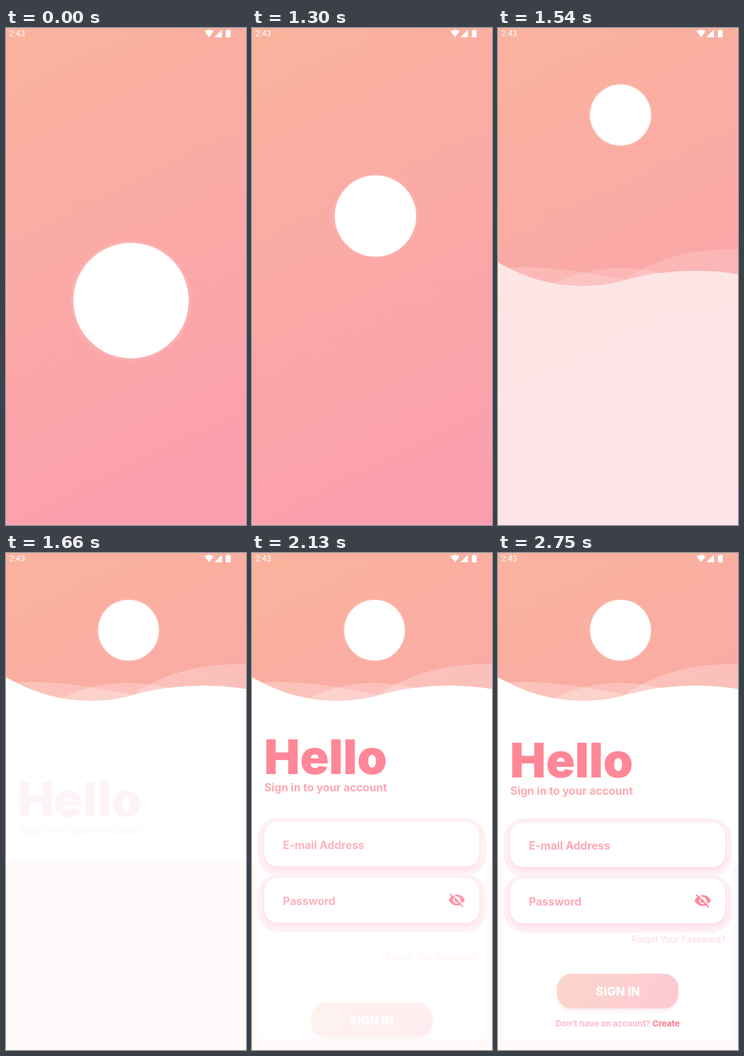
These frames come from a looping animation (429 by 888 pixels, 3.7 s). An HTML page:

```html
<!DOCTYPE html>
<html lang="en">
<head>
<meta charset="utf-8">
<title>Sign in</title>
<style>
  html, body { margin: 0; width: 100%; height: 100%; overflow: hidden; background: #faa6a7; }
  svg { display: block; width: 100%; height: 100%; }
  text { font-family: Inter, "Open Sans", sans-serif; font-optical-sizing: none; font-weight: 700; white-space: pre; }
  .clock { font: 400 14.8px Roboto, sans-serif; fill: #fff; }
  .title { font-size: 85.5px; font-weight: 900; fill: #ff8797; }
  .label { font-size: 19.6px; fill: #ffa8b4; }
  .forgot { font-size: 15.3px; font-weight: 400; fill: #fdd7dd; }
  .action { font-size: 21.2px; font-weight: 800; fill: #fff; }
  .create { font-size: 14.8px; fill: #ffb9c5; }
  .create tspan { font-weight: 800; fill: #ff8094; }
  .card { fill: #fff; filter: drop-shadow(0 4px 4px rgba(255, 150, 170, .25)); }
  .halo { fill: #fef0f3; }
  .button { fill: url(#buttonFill); filter: drop-shadow(0 4px 3px rgba(252, 202, 211, .4)); }
  #mark { fill: #fff; filter: drop-shadow(0 0 4px rgba(255, 225, 218, .65)); }
</style>
</head>
<body>
<svg viewBox="0 0 429 888" preserveAspectRatio="none">
  <defs>
    <linearGradient id="pageFill" gradientUnits="userSpaceOnUse" x1="0" y1="0" x2="429" y2="888">
      <stop stop-color="#fab39d"/><stop offset="1" stop-color="#fb9db0"/>
    </linearGradient>
    <linearGradient id="buttonFill" gradientUnits="userSpaceOnUse" x1="106" y1="753" x2="323" y2="815">
      <stop stop-color="#fbd5ca"/><stop offset="1" stop-color="#fdc9d4"/>
    </linearGradient>
  </defs>

  <rect width="429" height="888" fill="url(#pageFill)"/>

  <g id="sheet" fill="#fff">
    <g fill-opacity=".25">
      <path d="M0 233C30 229 70 230 110 234 160 240 200 248 235 255V290H0z"/>
      <path d="M98 261C135 242 175 232 215 232 245 232 272 236 295 242V290H98z"/>
      <path d="M225 254C285 213 350 197 429 199V290H225z"/>
    </g>
    <path d="M0 222C48 249 96 264 150 264 215 264 232 248 290 241 340 235 385 235.500 429 243V1600H0z"/>
  </g>

  <rect id="tint" y="551" width="429" height="337" fill="#fffaf9"/>
  <rect id="panel" x="10" y="500" width="409" height="368" fill="#fff"/>

  <circle id="mark" r="103"/>

  <g id="hello">
    <text class="title" x="21.500" y="400.500">Hello</text>
    <text class="label" x="22" y="431.500">Sign in to your account</text>
  </g>

  <g id="fields">
    <rect class="halo" x="10" y="474" width="408" height="104" rx="40" ry="36"/>
    <rect class="halo" x="10" y="574.500" width="408" height="104" rx="40" ry="36"/>
    <rect class="card" x="22" y="481.500" width="384" height="79.500" rx="23"/>
    <rect class="card" x="22" y="582" width="384" height="79.500" rx="23"/>
    <text class="label" x="55.200" y="529.500">E-mail Address</text>
    <text class="label" x="55.200" y="630">Password</text>
    <g transform="translate(350.400 605.500) scale(1.3)" fill="#ff8797">
      <path fill-rule="evenodd" d="M1 12C2.700 7.600 7 4.500 12 4.500S21.300 7.600 23 12C21.300 16.400 17 19.500 12 19.500S2.700 16.400 1 12zM7 12a5 5 0 0 0 10 0a5 5 0 0 0-10 0z"/>
      <circle cx="12" cy="12" r="3"/>
      <path d="M3.900 1.100L22.800 20" stroke="#fff" stroke-width="1.800"/>
      <path d="M2.640 3.640L20.360 21.360" stroke="#ff8797" stroke-width="1.800"/>
    </g>
  </g>

  <text id="forgot" class="forgot" x="406.500" y="697" text-anchor="end">Forgot Your Password?</text>

  <g id="button">
    <rect class="button" x="105.500" y="753" width="217" height="62" rx="26"/>
    <text class="action" x="214.300" y="792" text-anchor="middle">SIGN IN</text>
  </g>

  <text id="create" class="create" x="213.900" y="849" text-anchor="middle">Don't have an account? <tspan>Create</tspan></text>

  <g fill="#fff">
    <text class="clock" x="5.500" y="15.300">2:43</text>
    <path d="M363 16.500L355 6Q363 0 371 6z"/>
    <path d="M372.500 16.500H386V3z"/>
    <path d="M395.300 4V2.700H399.200V4H401.500V16.700H393V4z"/>
  </g>
</svg>

<script>
const LOOP = 3700, START = 1120, END = 2750, STEP = 30;
const el = id => document.getElementById(id);
const clamp = v => Math.max(0, Math.min(1, v));
const easeInOut = u => u < .5 ? 2 * u * u : 1 - 2 * (1 - u) ** 2;

// Value at x in a table of [x, value] points
function lookup(table, x) {
  const i = table.findIndex(p => p[0] > x);
  if (i === 0) return table[0][1];
  if (i < 0) return table[table.length - 1][1];
  const [x0, a] = table[i - 1], [x1, b] = table[i];
  return a + (b - a) * (x - x0) / (x1 - x0);
}

const markY = [[1110, 487], [1120, 484], [1150, 469], [1200, 429], [1250, 384], [1300, 336],
  [1360, 280], [1420, 226], [1480, 183], [1540, 155.5], [1590, 142], [1640, 138]];
const markScale = [[1110, 1], [1120, .99], [1160, .94], [1210, .856], [1260, .768], [1300, .705],
  [1360, .626], [1420, .57], [1480, .54], [1540, .529], [1600, .527]];
// Rise with a small overshoot, by age
const rise = [[0, 75], [60, 62], [110, 43], [180, 21], [240, 6], [300, -4.5], [380, -6.5],
  [490, -5], [700, -1.5], [900, 0]];

// id, start, fade length
const items = [
  ["hello", 1640, 230],
  ["fields", 1830, 320],
  ["forgot", 1960, 420],
  ["button", 2020, 300],
  ["create", 2110, 610]
];

function place(id, x, y, opacity, scale = 1) {
  const node = el(id);
  node.style.opacity = opacity;
  node.style.transform = `translate(${x}px, ${y}px) scale(${scale})`;
}

function draw(time) {
  const t = time < START ? 0 : Math.min(END, START + Math.floor((time - START) / STEP) * STEP);

  const scale = lookup(markScale, t);
  place("mark", 219 + (scale - .527) * 9.5, lookup(markY, t), 1, scale);

  const p = easeInOut(clamp((t - 1380) / 260));
  place("sheet", 0, 665 * (1 - p), p);
  el("tint").style.opacity = t >= 1660 ? 1 : 0;
  el("panel").style.opacity = t >= 1840 ? 1 : 0;

  for (const [id, start, fade] of items) {
    const age = t - start;
    place(id, 0, lookup(rise, age), clamp(age / fade));
  }
}

const begin = performance.now();
function tick() {
  draw((performance.now() - begin) % LOOP);
  requestAnimationFrame(tick);
}
draw(0);
requestAnimationFrame(tick);
</script>
</body>
</html>
```
